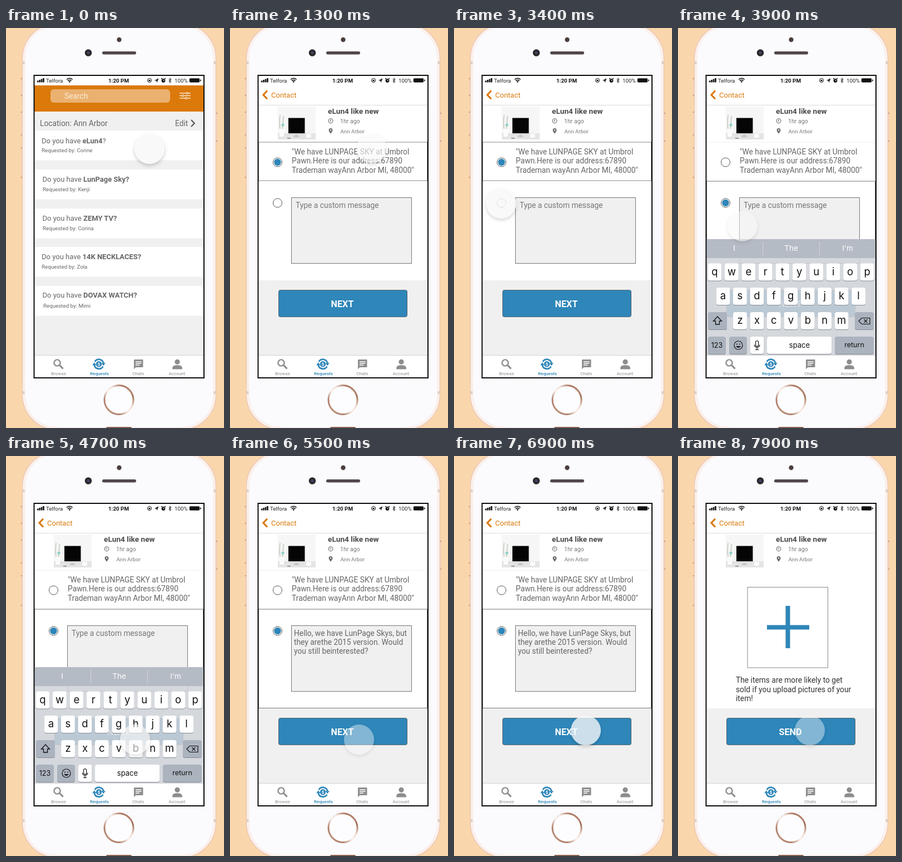
An HTML page that plays this animation: 392 px wide and 718 px high, repeating every 8000 ms.

```html
<!DOCTYPE html>
<html lang="en">
<head>
<meta charset="utf-8">
<title>Request flow</title>
<style>
html, body { margin: 0; width: 100%; height: 100%; overflow: hidden; background: #fad6ac; }
svg { display: block; width: 392px; height: 718px; font-family: Roboto, sans-serif; }
text { white-space: pre; }
.key { font-family: Inter, sans-serif; }
#touch { filter: drop-shadow(0 3px 3px rgba(0, 0, 0, .2)); }
</style>
</head>
<body>
<svg id="stage" viewBox="0 0 392 718"></svg>
<script>
const BLUE = '#2e86b9', ORANGE = '#db790a', GRAY = '#f0f0f0', INK = '#666';
const LOOP = 8000;

const rect = (x, y, w, h, fill, more = '') =>
  `<rect x="${x}" y="${y}" width="${w}" height="${h}" fill="${fill}" ${more}/>`;
const circle = (x, y, r, fill, more = '') =>
  `<circle cx="${x}" cy="${y}" r="${r}" fill="${fill}" ${more}/>`;
const line = (d, color, width = 1, more = '') =>
  `<path d="${d}" fill="none" stroke="${color}" stroke-width="${width}" ${more}/>`;
const shape = (d, fill, more = '') => `<path d="${d}" fill="${fill}" ${more}/>`;
const text = (x, y, size, fill, content, more = '') =>
  `<text x="${x}" y="${y}" font-size="${size}" fill="${fill}" ${more}>${content}</text>`;
const lines = (x, y, fill, rows) => rows.map((row, i) => text(x, y + i * 16.2, 13.8, fill, row)).join('');
const group = (id, content) => `<g id="${id}">${content}</g>`;
const MID = 'text-anchor="middle"', BOLD = 'font-weight="700"';

function phone() {
  const sideButtons = [[27, 90, 32], [27, 150, 43], [27, 214, 55], [377, 152, 52]]
    .map(([x, y, h]) => rect(x, y, 3, h, '#f5d3bb') + rect(x, y, 3, 2, '#b98a72') + rect(x, y + h - 2, 3, 2, '#b98a72')).join('');
  const bands = [[29.5, 60], [373, 60], [29.5, 652], [373, 652]]
    .map(([x, y]) => rect(x, y, 5, 5, '#e2cdc3')).join('');
  return `<defs><linearGradient id="ring" x1="0" y1="1" x2="1" y2="0">
      <stop offset="0" stop-color="#c79b86"/><stop offset=".25" stop-color="#b07f69"/>
      <stop offset=".45" stop-color="#f8ece7"/><stop offset=".6" stop-color="#f3e2da"/>
      <stop offset=".8" stop-color="#a8735c"/><stop offset="1" stop-color="#cfa28e"/></linearGradient></defs>`
    + sideButtons
    + rect(29.5, -8, 348, 729, '#fdf1ec', 'rx="62" stroke="#ecc9b8" stroke-width="1.6"')
    + bands
    + rect(34, -4, 339, 721, '#fbfbfe', 'rx="58" stroke="#f7ebe6" stroke-width="1"')
    + circle(203.5, 21, 4.2, '#4b3f3c')
    + circle(148, 44.5, 6.3, '#2c2829') + circle(148, 44.5, 2.4, '#3d4670')
    + rect(173, 42, 61, 5.4, '#51474a', 'rx="2.7"')
    + circle(203, 667.5, 26, '#fdfdff', 'stroke="url(#ring)" stroke-width="3"')
    + rect(180, 716, 46, 4, '#8a6252', 'rx="2"');
}

function statusBar() {
  const bars = [3, 4.5, 6, 7.5].map((h, i) => rect(56 + i * 3.4, 97.5 - h, 2.6, h, '#111')).join('');
  return rect(51, 86, 304, 17, '#fff') + bars
    + text(72, 97.6, 9.8, '#222', 'Telfora')
    + line('M109 92.5Q114.3 88 119.6 92.5M111 94.8Q114.3 92 117.6 94.8', '#111', 1.6)
    + circle(114.3, 96.6, 1.4, '#111')
    + text(202.5, 97.6, 9.8, '#111', '1:20 PM', MID + BOLD)
    + circle(258, 94, 3.6, 'none', 'stroke="#111"') + rect(256.4, 93, 3.2, 2.6, '#111')
    + shape('M267 94.2L274.5 90.2L271.3 98.2L270.7 94.8Z', '#111')
    + circle(283, 94.5, 3, '#111', 'stroke="#111"') + line('M279 91.5L281 90M287 91.5L285 90', '#111', 1.4)
    + line('M283 92.5V94.6H284.8', '#fff', .8)
    + line('M292.6 92L297 96.4L294.8 98.4V90L297 92L292.6 96.4', '#111', .9)
    + text(303, 97.6, 9.8, '#222', '100%')
    + rect(330, 90.5, 18, 7, '#111', 'rx="1.5" stroke="#555" stroke-width=".8"')
    + rect(349, 92.6, 1.6, 3, '#111', 'rx=".7"');
}

function tabBar() {
  const tone = '#8d8d8d';
  const label = (x, name, color = '#8a8a8a', more = '') => text(x, 623.4, 8.1, color, name, MID + more);
  return rect(51, 587, 304, 40, '#fff') + line('M51 587.5H355', '#d2d2d2')
    + circle(92, 601, 5.6, 'none', `stroke="${tone}" stroke-width="2.4"`)
    + line('M96.4 605.4L102.6 611.6', tone, 3)
    + circle(167, 603.3, 5.2, BLUE)
    + text(167, 606.3, 8, '#fff', '$', MID + BOLD)
    + line('M159.6 599A8.5 8.5 0 0 1 175.2 601.5M174.4 607.6A8.5 8.5 0 0 1 158.8 605.1', BLUE, 2.8)
    + shape('M171.6 601.3H178.8L175.2 606.3ZM162.4 605.3H155.2L158.8 600.3Z', BLUE)
    + shape('M231.5 595H245.5Q246.5 595 246.5 596V608Q246.5 609 245.5 609H233.5L230 612.2V596.5Q230 595 231.5 595Z', tone)
    + line('M233 599H243.5M233 602H243.5M233 605H240', '#fff', 1.3)
    + circle(308, 599.3, 4.6, tone)
    + shape('M299.2 612.6V610Q299.2 605.2 308 605.2T316.8 610V612.6Z', tone)
    + label(94.5, 'Browse') + label(168, 'Requests', BLUE, 'font-weight="500"')
    + label(237.8, 'Chats') + label(307.5, 'Account');
}

function listPage() {
  // name, asker, row top, text x, asker x
  const rows = [
    ['eLun4', 'Corine', 184, 64, 64, '?'],
    ['LunPage Sky?', 'Kenji', 254, 65.5, 66],
    ['ZEMY TV?', 'Corina', 324, 65.5, 66],
    ['14K NECKLACES?', 'Zola', 393, 64, 64],
    ['DOVAX WATCH?', 'Mimi', 463, 65.5, 67],
  ].map(([item, asker, y, x, askerX, tail = ''], i) => {
    const base = y + (i % 3 ? 22 : 23) - (i > 2 ? .6 : 0);
    return rect(51, y, 304, 53.5, '#fff')
      + text(x, base, 13, INK, `Do you have <tspan ${BOLD}>${item}</tspan>${tail}`)
      + text(askerX, y + (i ? 38.6 : 39), 9.76, INK, `Requested by: ${asker}`);
  }).join('');
  const slider = [[117, 326], [121.5, 318], [126, 324]].map(([y, x]) =>
    line(`M312 ${y}H332`, '#fff', 1.2) + circle(x, y, 1.7, ORANGE, 'stroke="#fff"')).join('');
  return rect(51, 103, 304, 484, GRAY) + rect(51, 103, 304, 47, ORANGE)
    + rect(80, 110, 215, 24, '#fff', 'rx="6" opacity=".42"')
    + text(105, 127.3, 13.8, '#fbebd6', 'Search') + slider
    + text(61, 175.8, 13.8, INK, 'Location: Ann Arbor')
    + text(304, 175.8, 13.8, INK, 'Edit')
    + line('M333 165L338.8 171L333 177', '#555', 2.2) + rows;
}

function contactHeader() {
  return rect(51, 103, 304, 350, '#fff') + rect(51, 453, 304, 134, GRAY)
    + line('M67 112.5L60 120L67 127.5', ORANGE, 3.2)
    + text(74, 124.8, 13, ORANGE, 'Contact') + line('M51 138.5H355', '#dcdcdc')
    + rect(86, 141, 68, 59, '#f6f6f6') + rect(86, 189, 68, 11, '#e4e4e4')
    + line('M91 190Q88 172 90 156M93 190Q96 174 96 158', '#c3cbbd', 1.6)
    + circle(95, 174, 2.6, '#8fd0c6') + rect(89, 181, 8, 14, '#fbfbfb')
    + rect(105, 161.5, 29.5, 27.5, '#050505') + rect(105, 189, 29.5, 3, '#dedede')
    + shape('M117 192H122L125 196H114Z', '#c8c8c8') + rect(103, 197, 6, 1.6, '#888')
    + rect(137, 190, 9, 7, '#fafafa')
    + text(176, 154, 13.7, '#4a4a4a', 'eLun4 like new', BOLD)
    + circle(181, 166.7, 3.9, 'none', 'stroke="#666" stroke-width="1.1"') + line('M181 164.2V167H179.2', INK)
    + text(198, 170.5, 10.57, '#777', '1hr ago')
    + shape('M181 189.8C179 186.8 177.6 185.2 177.6 183.3A3.4 3.4 0 0 1 184.4 183.3C184.4 185.2 183 186.8 181 189.8Z', INK)
    + circle(181, 183.3, 1.2, '#fff') + text(198.5, 189, 9.76, '#777', 'Ann Arbor');
}

const button = label =>
  rect(87.5, 470.5, 231, 48, BLUE, 'rx="3" stroke="#56656e"')
  + text(202, 500.6, 16.2, '#fff', label, MID + BOLD);

const picked = y => circle(85.5, y, 6.2, BLUE);

function contactPage() {
  const radio = y => circle(85.5, y, 8, '#fff', 'stroke="#555"');
  return contactHeader() + radio(241) + radio(314)
    + group('first', rect(51.5, 205, 303, 69, 'none', 'stroke="#8a8a8a"') + picked(241))
    + group('second', line('M51 205H355', '#eee') + rect(51.5, 275, 303, 177.5, 'none', 'stroke="#777"') + picked(314))
    + lines(111, 227.2, INK, ['"We have LUNPAGE SKY at Umbrol', 'Pawn.Here is our address:67890', 'Trademan wayAnn Arbor MI, 48000"'])
    + rect(110.5, 304.5, 216, 118, GRAY, 'stroke="#777"')
    + group('hint', text(118, 323, 13.8, '#777', 'Type a custom message'))
    + group('typed', lines(115, 323, INK, ['Hello, we have LunPage Skys, but', 'they arethe 2015 version. Would', 'you still beinterested?']))
    + button('NEXT');
}

function keyboard() {
  const cap = (x, y, w, fill = '#fff') =>
    rect(x, y + 1, w, 31, '#858b93', 'rx="4"') + rect(x, y, w, 31, fill, 'rx="4"');
  const label = (x, y, size, content) => text(x, y, size, '#111', content, MID + 'class="key"');
  const dark = '#abb3be';
  const letters = [['qwertyuiop', 66, 422.5], ['asdfghjkl', 81, 466], ['zxcvbnm', 111.5, 510]]
    .map(([row, x, y]) => [...row].map((c, i) =>
      cap(x + i * 30.45 - 12.4, y, 24.8) + label(x + i * 30.45, y + 21, 18.5, c)).join('')).join('');
  const hints = [['I', 101], ['The', 203.5], ["I'm", 305]]
    .map(([word, x]) => text(x, 400.3, 13.5, '#fff', word, MID + 'class="key"')).join('');
  return rect(51, 379, 304, 208, '#d0d4da', 'opacity=".87"') + rect(51, 379, 304, 34, '#b5bbc4')
    + line('M152.5 384V408M254.5 384V408', '#d0d4d9') + hints + letters
    + cap(54, 510, 34, dark) + line('M71 518L78.5 526H74.5V532H67.5V526H63.5Z', '#111', 1.3)
    + cap(318, 510, 34, dark) + line('M325 526L330.5 520.5H345V531.5H330.5ZM334.5 523L340.5 529M340.5 523L334.5 529', '#111', 1.2)
    + cap(54, 554, 32, dark) + label(70, 574, 12.5, '123')
    + cap(92, 554, 32, dark) + circle(108.5, 569.5, 7.5, 'none', 'stroke="#111" stroke-width="1.2"')
    + circle(106, 567.5, 1, '#111') + circle(111, 567.5, 1, '#111') + shape('M104 571H113Q108.5 577 104 571Z', '#111')
    + cap(130, 554, 24.5) + rect(139.6, 561.5, 5, 10, 'none', 'rx="2.5" stroke="#111" stroke-width="1.2"')
    + line('M137.3 568.5A4.8 4.8 0 0 0 146.9 568.5M142.1 573.5V577.5M139 577.5H145.2', '#111', 1.2)
    + cap(160, 554, 116.5) + label(218.5, 574, 13, 'space')
    + cap(282, 554, 70, dark) + label(317, 573, 12.5, 'return');
}

function sendPage() {
  return contactHeader()
    + rect(125, 235.5, 144.5, 144.5, '#fff', 'stroke="#888"')
    + rect(193.5, 269, 8, 76, BLUE) + rect(160, 303.5, 76, 8, BLUE)
    + lines(104, 407.3, '#333', ['The items are more likely to get', 'sold if you upload pictures of your', 'item!'])
    + button('SEND');
}

const stage = document.getElementById('stage');
stage.innerHTML = phone() + rect(51, 86, 304.5, 541.5, '#fff')
  + contactPage() + group('keys', keyboard()) + group('list', listPage()) + group('send', sendPage())
  + statusBar() + tabBar()
  + rect(50.5, 85, 305.5, 543, 'none', 'stroke="#0b0b0b" stroke-width="2"')
  + group('touch', circle(0, 0, 26.6, '#f9f9f9', 'stroke="#fff" stroke-width=".8"'));

// Keyframes are [time, value] pairs, eased in and out between neighbours.
function at(t, keys) {
  const i = keys.findIndex(([time]) => time > t);
  if (i === 0) return keys[0][1];
  if (i < 0) return keys[keys.length - 1][1];
  const [t0, a] = keys[i - 1], [t1, b] = keys[i];
  const p = (t - t0) / (t1 - t0);
  return a + (b - a) * p * p * (3 - 2 * p);
}

const tracks = {
  list: [[90, 1], [200, 0]],
  first: [[3550, 1], [3650, 0]],
  second: [[3550, 0], [3650, 1]],
  keys: [[3650, 0], [3850, 1], [4790, 1], [5000, 0]],
  hint: [[4790, 1], [5000, 0]],
  typed: [[4790, 0], [5000, 1]],
  send: [[7590, 0], [7800, 1]],
  touch: [[90, 1], [200, .7], [1000, .7], [1800, .5], [2800, .5], [3300, .84], [3500, .84], [3800, .5],
    [4200, .5], [4500, .7], [4700, .62], [5000, .42], [6300, .42], [6900, .78], [7100, .78], [7400, .42]],
};
const touchX = [[1000, 258], [1800, 247], [3100, 85], [3650, 85], [4500, 232], [5550, 232], [6000, 237]];
const touchY = [[1000, 217], [1800, 213], [3100, 315], [3650, 315], [4500, 509], [5550, 509], [6000, 492.5]];
const parts = Object.keys(tracks).map(id => [document.getElementById(id), tracks[id]]);
const touch = document.getElementById('touch');

function draw(now) {
  const t = now % LOOP;
  for (const [node, keys] of parts) node.setAttribute('opacity', at(t, keys));
  touch.setAttribute('transform', `translate(${at(t, touchX)} ${at(t, touchY)})`);
  requestAnimationFrame(draw);
}
draw(0);
</script>
</body>
</html>
```
